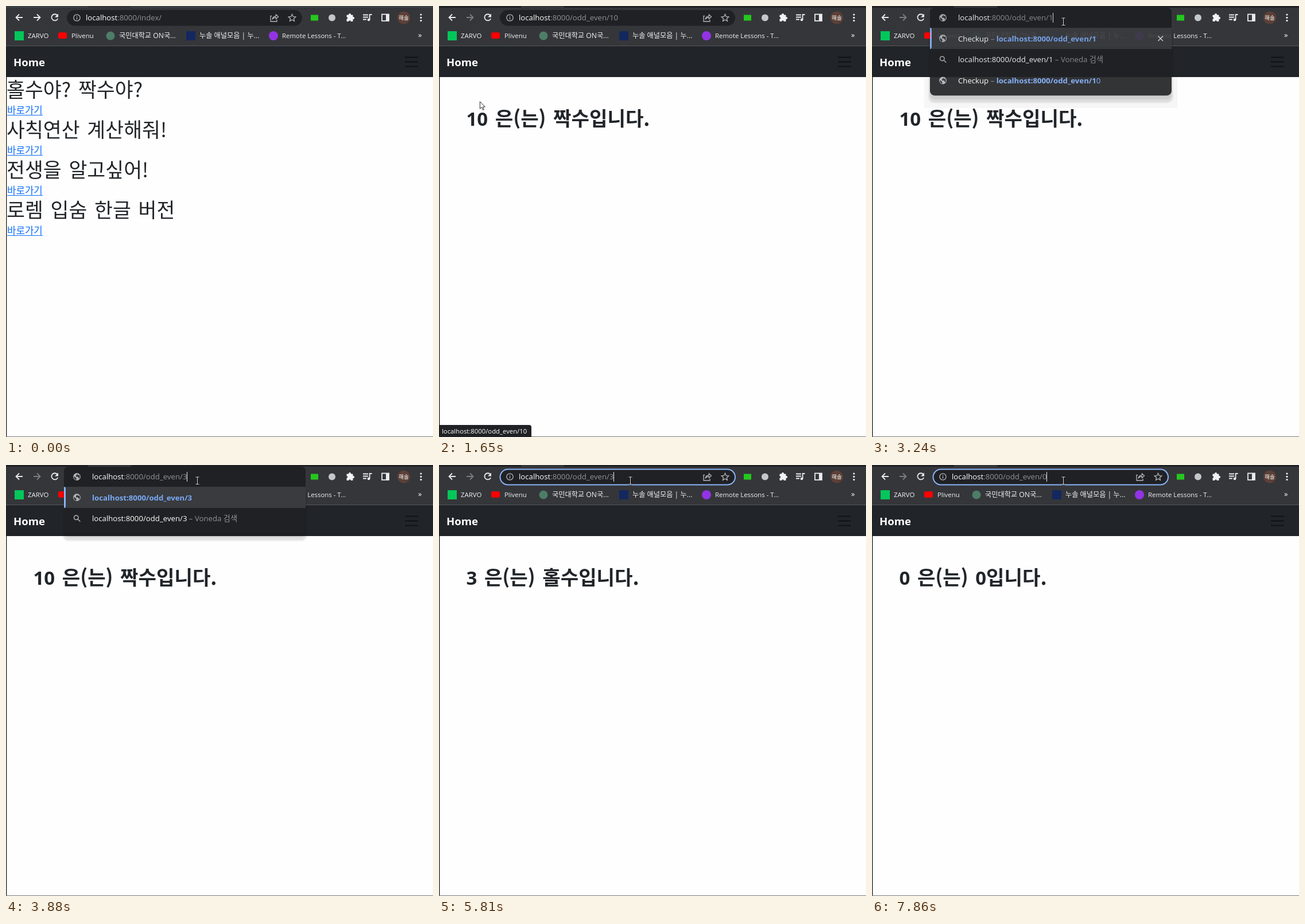
An HTML page that plays this animation: 744x752 px, repeating every 8000 ms.

```html
<!DOCTYPE html>
<html lang="ko">
<head>
<meta charset="utf-8">
<style>
html, body { margin: 0; width: 100%; height: 100%; overflow: hidden; background: #fff; }
svg { display: block; }
text { white-space: pre; fill: #fff; font: 13.2px "Open Sans", "Noto Sans CJK KR", "Noto Sans CJK", sans-serif; }
text.mark { font-size: 11.4px; fill: #f1f3f4; }
text.ko { font-size: 12.2px; }
text.head { font: 350 34.7px "Noto Sans CJK KR", "Noto Sans CJK", sans-serif; word-spacing: 3px; fill: #212529; }
text.bold { font-weight: 700; }
text.answer { font-size: 34.2px; }
.num { font-family: "Open Sans", sans-serif; font-size: 33px; }
text.link { font: 350 16.8px "Noto Sans CJK KR", "Noto Sans CJK", sans-serif; fill: inherit; }
.dim { fill: #8f9398; }
.blue { fill: #7baaf7; }
.strong { font-weight: 700; }
.line { fill: none; stroke: #e8eaed; stroke-width: 1.8; }
</style>
</head>
<body>
<svg width="744" height="752" viewBox="0 0 744 752">
  <rect width="744" height="752" fill="#fefefe"/>
  <rect width="744" height="70" fill="#35363a"/>
  <rect y="69" width="744" height="1" fill="#55575b"/>
  <rect y="70" width="744" height="54" fill="#212529"/>
  <rect y="70" width="1.3" height="682" fill="#202124"/>
  <rect y="751" width="744" height="1" fill="#77797c"/>

  <path class="line" d="M29 20H17.5M23 14.5L17.5 20L23 25.5"/>
  <path class="line" d="M89.3 16.2A5.6 5.6 0 1 0 90.2 22"/>
  <path d="M91 13.5V19.4H85Z" fill="#e8eaed"/>
  <rect x="106" y="7" width="410" height="27.5" rx="13.7" fill="#202124"/>
  <g fill="none" stroke="#b4b7bb" stroke-width="1.3">
    <circle cx="123.5" cy="20.5" r="5.6"/>
    <path d="M123.5 19.5V23.6M123.5 17V18.3"/>
    <path d="M463 17.5H461V27H472V24M464 23.5C464.5 19.5 467 17.8 470.5 17.7V15L474.5 18.8L470.5 22.6V20C467.5 20 465.5 21 464 23.5Z"/>
    <path d="M498.5 14.3L500.3 18.5L504.8 18.9L501.4 21.9L502.4 26.3L498.5 24L494.6 26.3L495.6 21.9L492.2 18.9L496.7 18.5Z"/>
  </g>
  <rect x="531" y="15.5" width="13" height="10" fill="#25c81e"/>
  <circle cx="568" cy="20.5" r="6" fill="#c4c7ca"/>
  <g fill="#f1f3f4">
    <rect x="593.5" y="15.5" width="11" height="11.5" rx="1"/>
    <circle cx="599" cy="15" r="2.1"/><circle cx="605" cy="21" r="2.1"/>
    <circle cx="723" cy="15" r="1.6"/><circle cx="723" cy="20.3" r="1.6"/><circle cx="723" cy="25.6" r="1.6"/>
    <circle cx="632" cy="24" r="2.3"/>
  </g>
  <g fill="#35363a"><circle cx="593.5" cy="21" r="1.8"/><circle cx="599" cy="27" r="1.8"/></g>
  <path class="line" d="M622 15.5H631M622 19.5H631M622 23.5H628M633.6 24V15H637.5"/>
  <rect class="line" x="655" y="14.5" width="12" height="11.5"/>
  <rect x="662" y="14.5" width="5" height="11.5" fill="#e8eaed"/>
  <circle cx="693" cy="20.5" r="11" fill="#5d4037"/>
  <text x="693" y="24" text-anchor="middle" style="font-size:9.5px">해솔</text>

  <rect x="15" y="44" width="16" height="16" fill="#03c75a"/>
  <text class="mark" x="38" y="56">ZARVO</text>
  <rect x="91" y="46" width="15" height="11" rx="3" fill="#f00"/>
  <text class="mark" x="114" y="56">Plivenu</text>
  <circle cx="182" cy="52" r="7.5" fill="#4d7d68"/>
  <text class="mark ko" x="197" y="56">국민대학교 ON국...</text>
  <rect x="314" y="44" width="16" height="16" fill="#14285f"/>
  <text class="mark ko" x="337" y="56">누솔 애널모음 | 누...</text>
  <circle cx="466" cy="52" r="8" fill="#9233e6"/>
  <text class="mark" x="481" y="56">Remote Lessons - T...</text>
  <text x="718" y="55">»</text>

  <text class="bold" x="13" y="104.5" style="font-size:18.6px">Home</text>
  <path d="M695 89.5H718M695 97.5H718M695 105.5H718" stroke="#111315" stroke-width="2"/>
  <g id="live"></g>
</svg>
<script>
const live = document.getElementById('live');
const pen = document.createElement('canvas').getContext('2d');
const host = 'localhost', base = ':8000/odd_even/';

const urlWidth = s => {
  pen.font = '13.2px "Open Sans", sans-serif';
  return pen.measureText(s).width;
};
const urlText = (x, path) => `<text x="${x}" y="25">${host}<tspan class="dim">${path}</tspan></text>`;
const caret = (x, path) =>
  `<rect x="${Math.round(x + urlWidth(host + path))}" y="12" width="1" height="17" fill="#e8eaed"/>`;

const globe = y => `<circle cx="123.5" cy="${y}" r="6.4" fill="#b0b4b9"/>
  <path transform="translate(123.5 ${y})" d="M-5 -1L-1 2.5V5.5C-4 5 -5.5 2 -5 -1ZM1 -5.3L-1.5 -2V0H2L4 3.5C6 1 5.5 -2 3.8 -3.5L1.5 -2.5Z" fill="#303236"/>`;

function index(hover) {
  const titles = ['홀수야? 짝수야?', '사칙연산 계산해줘!', '전생을 알고싶어!', '로렘 입숨 한글 버전'];
  return titles.map((s, i) => {
    const y = 70 * i;
    return `<text class="head" x="1" y="${158.5 + y}">${s}</text>
      <g fill="${hover && !i ? '#0a58ca' : '#0d6efd'}"><text class="link" x="2" y="${188 + y}">바로가기</text>
      <rect x="2" y="${190 + y}" width="62" height="1"/></g>`;
  }).join('');
}

const answer = s => `<text class="head bold answer" x="47.5" y="209">${
  s.replace(/\d+/g, '<tspan class="num">$&</tspan>')}</text>`;

// Suggestion row: typed part bold, completion regular
function hit(y, title, typed, rest = '') {
  return globe(y) + `<text x="150" y="${y + 5}">${title ? 'Checkup<tspan class="dim"> – </tspan>' : ''}` +
    `<tspan class="blue strong">${host + base + typed}</tspan><tspan class="blue">${rest}</tspan></text>`;
}

function panel(typed, known, fade) {
  const same = known.includes(typed);
  const more = known.filter(k => k !== typed && k.startsWith(typed));
  const bottom = 119.5 + 36.7 * more.length;
  const path = base + typed;
  const shade = (grow, drop, alpha) =>
    `<rect x="${101 - grow}" y="40" width="${421 + 2 * grow}" height="${bottom + drop - 40}" rx="${8 + grow}" fill="#000" opacity="${alpha}"/>`;
  return (fade ? '<rect x="91" y="124" width="441" height="54" opacity=".03"/>' : '') +
    '<rect x="101" y="3" width="421" height="35" rx="8" fill="#202124"/>' +
    `<g opacity="${fade ? .91 : 1}">` +
    shade(4, 14, .03) + shade(2, 12, .08) + shade(0, 7, .08) +
    `<rect x="101" y="3" width="421" height="${bottom - 3}" rx="8" fill="#202124"/>
    <rect x="101" y="38" width="421" height="37" fill="#393b3e"/>
    <path d="M101 38Q104 38 104 41V72Q104 75 101 75Z" fill="#8ab4f8"/>` +
    globe(20.5) + urlText(150, path) + caret(150, path) + hit(56.5, same, typed) +
    (same ? '<path d="M498.5 52.5L507 61M507 52.5L498.5 61" stroke="#d0d3d6" stroke-width="1.6"/>' : '') +
    `<g fill="none" stroke="#b0b4b9" stroke-width="1.5"><circle cx="122.3" cy="91.8" r="3.8"/><path d="M125 94.5L129.3 98.8"/></g>
    <text x="150" y="98">${host + path}<tspan class="dim"> – Voneda 검색</tspan></text>` +
    more.map((k, i) => hit(130 + 36.7 * i, true, typed, k.slice(typed.length))).join('') + '</g>';
}

function bar(path, ring, selected, showCaret) {
  return (ring ? `<rect x="106.5" y="7.5" width="409.5" height="27" rx="13.5" fill="none" stroke="#8ab4f8" stroke-width="2" opacity="${ring}"/>` : '') +
    (selected ? `<rect x="139" y="10" width="${urlWidth(host + path)}" height="21" fill="#185abc"/>` : '') +
    urlText(139, path) + (showCaret ? caret(139, path) : '');
}

const shapes = {
  arrow: '<path d="M0 0V12.5L3 9.8L5 14.5L7 13.6L5 9.2H9Z" fill="#fff" stroke="#111" stroke-width=".9"/>',
  hand: '<path d="M5 .5C6.2 .5 6.8 1.2 6.8 2.3V7L12.5 8.3Q14.5 9 14.3 11L13 18H5.5L1 12Q0 10 1.6 9.5L3.2 10.8V2.3C3.2 1.2 3.8 .5 5 .5Z" fill="#fff" stroke="#111"/>',
  beam: '<path d="M-3 -6H3M0 -6V6.5M-3 6.5H3" fill="none" stroke="#111" stroke-width="2.4"/><path d="M-3 -6H3M0 -6V6.5M-3 6.5H3" fill="none" stroke="#ddd"/>'
};

// The pointer is sampled about ten times a second
function glide(t, start, from, to) {
  const s = Math.min(7, Math.max(0, Math.floor((t - start + 5) / 103))) / 7;
  const e = s * s * (3 - 2 * s);
  return from.map((a, i) => a + (to[i] - a) * e);
}

function pointer(t) {
  if (t < 210) return '';
  const shape = t < 1030 ? 'arrow' : t < 1550 ? 'hand' : t < 2270 ? 'arrow' : 'beam';
  const [x, y] = t < 1550 ? glide(t, 210, [496, 12], [56, 180]) : glide(t, 1550, [56, 175], [333.5, 27]);
  return `<g transform="translate(${x} ${y})">${shapes[shape]}</g>`;
}

function status(t) {
  const fadeIn = Math.floor((t - 1030) / 100 + 1) / 3;
  const fadeOut = 1 - Math.floor((t - 1850) / 100 + 1) / 3;
  const alpha = Math.min(1, fadeIn, fadeOut);
  return alpha <= 0 ? '' : `<g opacity="${alpha}"><path d="M1 731H157Q161 731 161 735V752H1Z" fill="#202124"/>
    <text x="5" y="746" style="font-size:11.3px">${host + base}10</text></g>`;
}

function address(t) {
  if (t < 1550) return bar(':8000/index/');
  if (t < 3240) return bar(base + '10', t >= 2380 ? 1 : 0, t >= 2380 && t < 2810, t >= 2810);
  if (t < 3560) return panel('1', ['1', '10'], t < 3350);
  if (t < 3880) return panel('', ['1', '10']);
  if (t < 4310) return panel('3', []);
  if (t < 6240) return bar(base + '3', t < 5390 ? 0 : t < 5490 ? .5 : 1, t >= 5390 && t < 5810, t >= 5810);
  if (t < 6450) return panel('', ['3', '1', '10']);
  if (t < 6770) return panel('0', []);
  return bar(base + '0', t < 7420 ? 0 : t < 7530 ? .5 : 1, t >= 7420 && t < 7860, t >= 7860);
}

function scene(t) {
  const page = t < 1550 ? index(t >= 1030)
    : answer(t < 4420 ? '10 은(는) 짝수입니다.' : t < 6770 ? '3 은(는) 홀수입니다.' : '0 은(는) 0입니다.');
  const onIndex = t < 1550;
  // The tab strip is lighter until the window takes focus
  const chrome = `<path d="M0 0H143V3H0ZM218 0H744V3H218Z" fill="${onIndex ? '#3c4043' : '#202124'}"/>
    <path class="line" d="M48 20H59.5M54 14.5L59.5 20L54 25.5" style="stroke:${onIndex ? '#e8eaed' : '#7b7d80'}"/>`;
  return chrome + page + status(t) + address(t) + pointer(t);
}

let shown = '';
function tick() {
  const next = scene(performance.now() % 8000);
  if (next !== shown) live.innerHTML = shown = next;
  requestAnimationFrame(tick);
}
tick();
</script>
</body>
</html>
```
